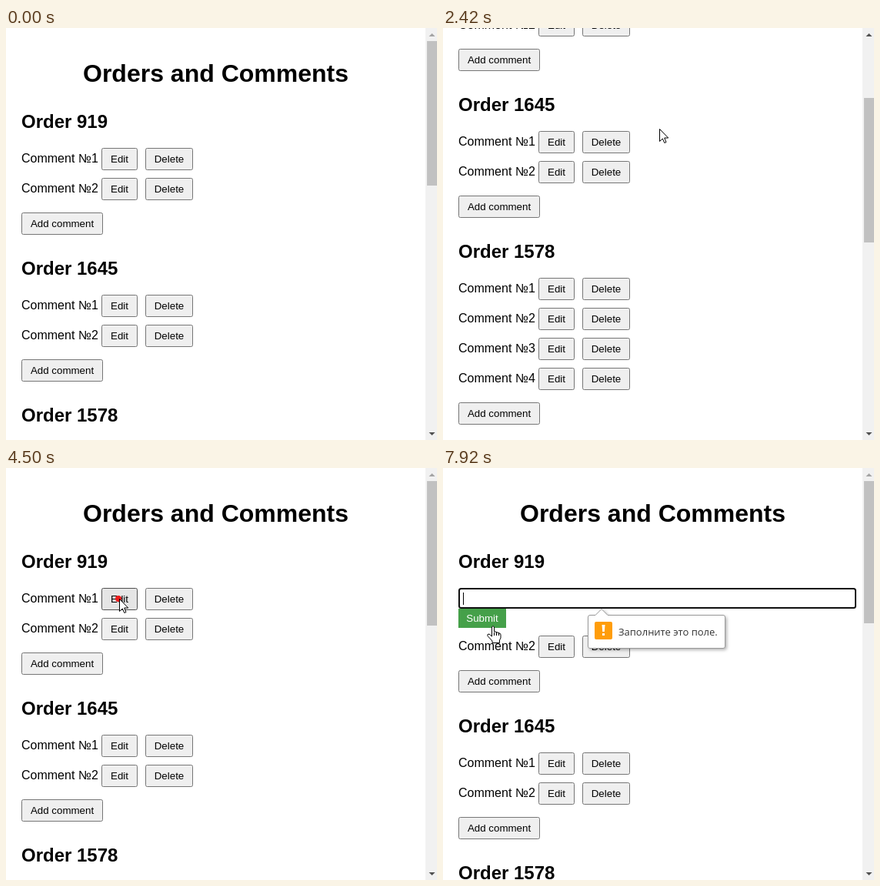
These frames come from a looping animation (560 px wide and 536 px high, 8000 ms). An HTML page with a canvas:

```html
<!DOCTYPE html>
<html lang="en">
<head>
<meta charset="utf-8">
<title>Orders and Comments</title>
<style>
  html, body { margin: 0; width: 100%; height: 100%; overflow: hidden; background: #fff; }
  canvas { display: block; }
</style>
</head>
<body>
<canvas id="stage" width="560" height="536"></canvas>
<script>
const ctx = document.getElementById('stage').getContext('2d');
const W = 560, H = 536, LOOP = 8000, FPS = 12;
const SANS = '"Liberation Sans", Arial, sans-serif';
const SMALL = '13.333px ' + SANS;
const VALUE = 'Comment №1';

const ORDERS = [[919, 2], [1645, 2], [1578, 4], [1203, 2], [1874, 2], [1392, 2]];

// [start, end, from, to]
const SCROLLS = [
  [1458, 1740, 0, 100],
  [1960, 2260, 100, 200],
  [2357, 2620, 200, 300],
  [2637, 3123, 300, 0]
];

// [time, x, y]
const PATH = [
  [750, 300, 536], [1330, 281, 131], [2750, 281, 131], [2917, 280, 136],
  [3333, 271, 189], [3600, 296, 220], [4170, 147, 170], [4700, 147, 170],
  [5000, 143, 172], [5250, 143, 172], [5750, 4, 173], [6080, 26, 176],
  [6750, 26, 176], [7170, 63, 206]
];

// Mouse button: [down, up]
const PRESSES = [[4490, 4580], [5160, 5900], [7320, 7480]];
const EDIT_AT = 4580, FOCUS_AT = 5240, ERASE_AT = 6160, TIP_AT = 7600;

const clamp = (v, a, b) => Math.min(b, Math.max(a, v));
const smooth = u => u * u * (3 - 2 * u);
const within = (t, [a, b]) => t >= a && t < b;

function scrollAt(t) {
  let y = 0;
  for (const [a, b, from, to] of SCROLLS) {
    if (t >= a) y = from + (to - from) * smooth(clamp((t - a) / (b - a), 0, 1));
  }
  return Math.round(y);
}

function cursorAt(t) {
  let i = PATH.findIndex(p => p[0] > t);
  if (i < 0) i = PATH.length;
  const a = PATH[i - 1], b = PATH[i] || a;
  if (!a) return null;
  const u = a === b ? 0 : smooth((t - a[0]) / (b[0] - a[0]));
  return { x: Math.round(a[1] + (b[1] - a[1]) * u), y: Math.round(a[2] + (b[2] - a[2]) * u) };
}

function text(str, x, y, font, color = '#000', align = 'left') {
  ctx.font = font;
  ctx.fillStyle = color;
  ctx.textAlign = align;
  ctx.fillText(str, x, y);
}

function rect(x, y, w, h, color) {
  ctx.fillStyle = color;
  ctx.fillRect(x, y, w, h);
}

function poly(points, fill, stroke) {
  ctx.beginPath();
  points.forEach(([x, y]) => ctx.lineTo(x, y));
  ctx.closePath();
  if (fill) { ctx.fillStyle = fill; ctx.fill(); }
  if (stroke) { ctx.strokeStyle = stroke; ctx.lineWidth = 1; ctx.stroke(); }
}

function button(label, x, y, w, hover) {
  ctx.beginPath();
  ctx.roundRect(x + 0.5, y + 0.5, w - 1, 28, 2);
  ctx.fillStyle = hover ? '#e5e5e5' : '#efefef';
  ctx.fill();
  ctx.strokeStyle = hover ? '#4f4f4f' : '#767676';
  ctx.lineWidth = 1;
  ctx.stroke();
  text(label, x + w / 2, y + 19, SMALL, '#000', 'center');
}

function editForm(y, t, mouse) {
  const pressed = within(t, PRESSES[2]);
  const focused = t >= FOCUS_AT && !pressed;
  if (focused) {
    ctx.beginPath();
    ctx.roundRect(21, y + 1, 515, 25, 2.5);
    ctx.strokeStyle = '#101010';
    ctx.lineWidth = 2;
    ctx.stroke();
  } else {
    ctx.strokeStyle = '#ccc';
    ctx.lineWidth = 1;
    ctx.strokeRect(20.5, y + 0.5, 516, 26);
  }

  if (t < ERASE_AT) {
    text(VALUE, 26, y + 18, SMALL);
    if (t >= FOCUS_AT) selection(y, t, mouse);
  } else if (focused && (t < 6800 || t >= 7480)) {
    rect(26, y + 6, 1, 16, '#000');
  }

  const over = mouse.x < 82 && mouse.y >= y + 27 && mouse.y < y + 52;
  rect(20, y + 27, 62, 25, over ? '#45a049' : '#4caf50');
  text('Submit', 51, y + 44, SMALL, '#fff', 'center');
}

function selection(y, t, mouse) {
  const dragX = t < 5750 ? mouse.x : 0;
  let n = 0, x = 26;
  ctx.font = SMALL;
  while (n < VALUE.length && 26 + ctx.measureText(VALUE.slice(0, n + 1)).width <= dragX) n++;
  x += ctx.measureText(VALUE.slice(0, n)).width;
  const w = 26 + ctx.measureText(VALUE).width - x;
  if (w <= 0) return rect(Math.round(x), y + 6, 1, 16, '#000');
  ctx.save();
  ctx.beginPath();
  ctx.rect(x, y + 6, w, 16);
  ctx.clip();
  rect(x, y + 6, w, 16, '#0078d7');
  text(VALUE, 26, y + 18, SMALL, '#fff');
  ctx.restore();
}

function page(t, scroll, mouse) {
  text('Orders and Comments', 272.5, 70 - scroll, 'bold 32px ' + SANS, '#000', 'center');
  const hot = (x, y, w) => mouse && mouse.x >= x && mouse.x < x + w && mouse.y >= y && mouse.y < y + 29;
  let y = 130 - scroll;
  ORDERS.forEach(([id, count], order) => {
    text('Order ' + id, 20, y, 'bold 24px ' + SANS);
    y += 26;
    for (let n = 1; n <= count; n++) {
      if (order === 0 && n === 1 && t >= EDIT_AT) {
        editForm(y, t, mouse);
        y += 62;
        continue;
      }
      text('Comment №' + n, 20, y + 19, '16px ' + SANS);
      button('Edit', 124, y, 47, hot(124, y, 47));
      button('Delete', 181, y, 62, hot(181, y, 62));
      y += 39;
    }
    y += 6;
    button('Add comment', 20, y, 106, hot(20, y, 106));
    y += 81;
  });
}

function scrollbar(t, scroll) {
  const total = t >= EDIT_AT ? 1454 : 1431;
  const size = Math.round(502 * H / total);
  const top = 17 + Math.floor(scroll * (502 - size) / (total - H));
  rect(545, 0, 15, H, '#f1f1f1');
  rect(547, top, 13, size, '#c1c1c1');
  poly([[549.5, 11], [553.5, 7], [557.5, 11]], scroll ? '#505050' : '#a3a3a3');
  poly([[549.5, 526], [553.5, 530], [557.5, 526]], '#505050');
}

function tooltip(t) {
  const a = clamp((t - TIP_AT) / 250, 0, 1);
  if (!a) return;
  ctx.save();
  ctx.globalAlpha = a;
  ctx.beginPath();
  ctx.moveTo(198, 191.5);
  ctx.lineTo(206, 183.5);
  ctx.lineTo(214, 191.5);
  ctx.lineTo(364, 191.5);
  ctx.arcTo(366.5, 191.5, 366.5, 194, 2.5);
  ctx.arcTo(366.5, 234.5, 364, 234.5, 2.5);
  ctx.arcTo(188.5, 234.5, 188.5, 232, 2.5);
  ctx.arcTo(188.5, 191.5, 191, 191.5, 2.5);
  ctx.closePath();
  ctx.shadowColor = 'rgba(0,0,0,.35)';
  ctx.shadowBlur = 4;
  ctx.shadowOffsetX = ctx.shadowOffsetY = 2;
  ctx.fillStyle = '#fff';
  ctx.fill();
  ctx.shadowColor = 'transparent';
  ctx.strokeStyle = '#999';
  ctx.lineWidth = 1;
  ctx.stroke();
  ctx.beginPath();
  ctx.roundRect(197, 200, 23, 23, 2);
  ctx.fillStyle = '#ff9d0a';
  ctx.fill();
  poly([[206.5, 204], [210.5, 204], [209.8, 213], [207.2, 213]], '#fff');
  rect(207, 215, 3, 3, '#fff');
  text('Заполните это поле.', 228, 218, '13px "Open Sans", "Noto Sans", sans-serif', '#333');
  ctx.restore();
}

function arrow() {
  poly([[0.5, 0.5], [0.5, 16.5], [4.3, 13], [6.8, 18.5], [9, 17.5], [6.7, 12], [11.7, 12]], '#fff', '#000');
}

function beam() {
  ctx.fillStyle = '#000';
  ctx.fillRect(0, -6, 1, 13);
  for (const y of [-7, 7]) {
    ctx.fillRect(-3, y, 3, 1);
    ctx.fillRect(1, y, 3, 1);
  }
}

function hand() {
  poly([
    [0.5, 1], [2, -0.5], [3.5, 1], [3.5, 7], [6, 7], [7, 8], [9, 8], [10, 9], [11.5, 9.5],
    [12, 11], [12, 15], [10.5, 18], [10.5, 21.5], [1, 21.5], [1, 19], [-5, 12.5], [-5, 10.5],
    [-3, 10], [0.5, 13]
  ], '#fff', '#000');
  ctx.fillStyle = '#000';
  for (const x of [3, 6, 9]) ctx.fillRect(x, 8, 1, 4);
}

function pointer(t, { x, y }) {
  for (const [down, up] of PRESSES) {
    const a = t < down ? 0 : clamp(1 - (t - up) / 200, 0, 1);
    if (!a) continue;
    ctx.globalAlpha = a;
    ctx.fillStyle = '#ee1c1c';
    ctx.beginPath();
    ctx.arc(x - 1, y, 4, 0, 7);
    ctx.fill();
    ctx.globalAlpha = 1;
  }
  const form = t >= EDIT_AT;
  const inField = form && x >= 20 && y >= 156 && y < 183;
  const onSubmit = form && x >= 20 && x < 82 && y >= 183 && y < 208;
  ctx.save();
  ctx.translate(x, y);
  if (inField || within(t, PRESSES[1])) beam();
  else if (onSubmit) hand();
  else arrow();
  ctx.restore();
}

function draw(t) {
  const scroll = scrollAt(t), mouse = cursorAt(t);
  rect(0, 0, W, H, '#fff');
  page(t, scroll, mouse);
  scrollbar(t, scroll);
  tooltip(t);
  if (mouse) pointer(t, mouse);
}

function tick() {
  const t = performance.now() % LOOP;
  draw(Math.floor((t + 4) * FPS / 1000) * 1000 / FPS);
  requestAnimationFrame(tick);
}
tick();
</script>
</body>
</html>
```
